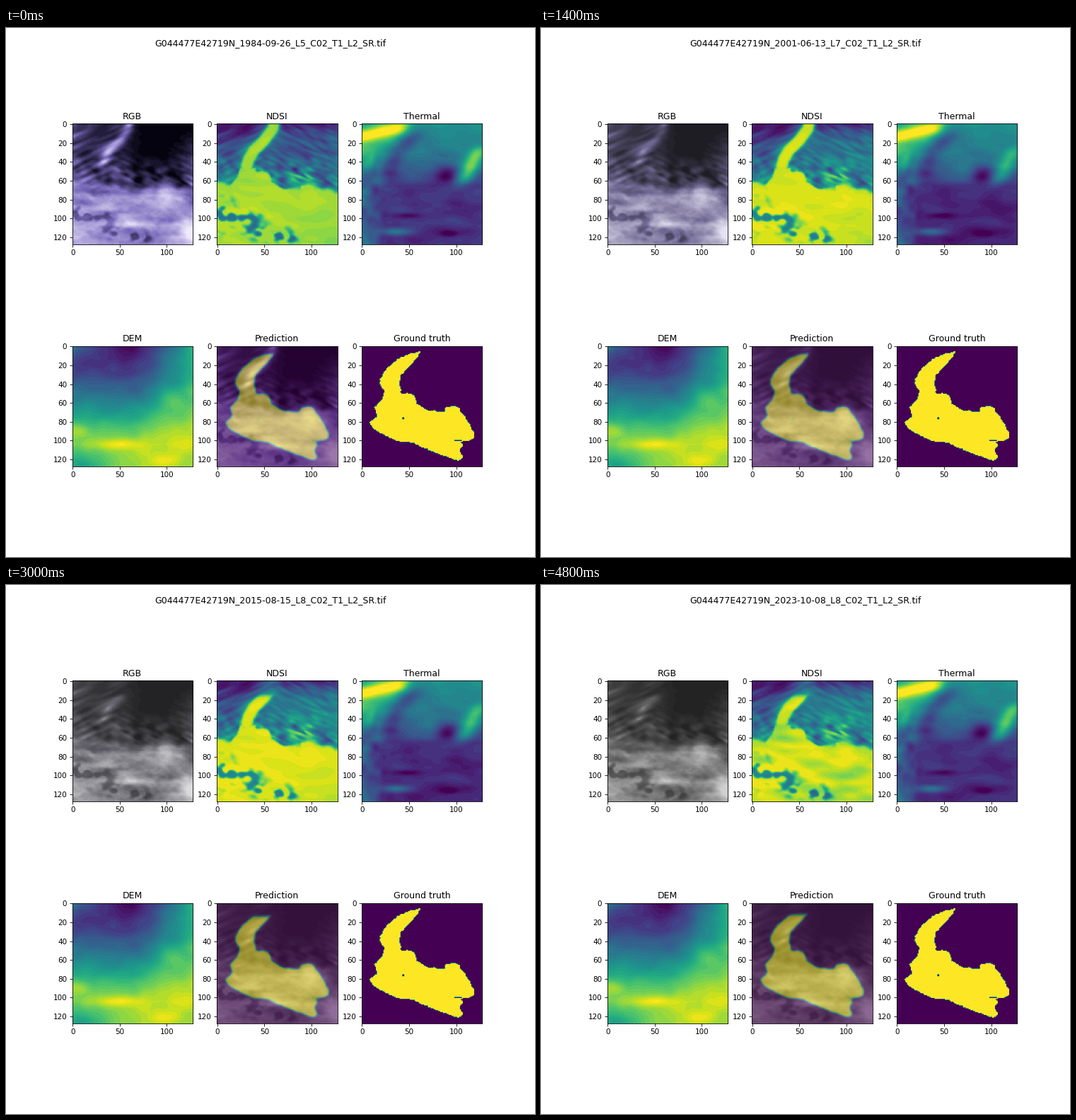
A matplotlib script that plays this animation: 748x748 px, repeating every 4.9 s.

```python
import numpy as np
import matplotlib.pyplot as plt
from matplotlib.animation import FuncAnimation
from matplotlib.path import Path

N = 128
FRAMES = 49
Y, X = np.mgrid[0:N, 0:N].astype(float)

# ---------- field helpers ----------


def noise(seed, length, width, angle=0):
    """Unit-variance noise, stretched along a direction."""
    ky, kx = np.meshgrid(np.fft.fftfreq(N), np.fft.fftfreq(N), indexing="ij")
    c, s = np.cos(angle), np.sin(angle)
    u, v = kx * c + ky * s, ky * c - kx * s
    low = np.exp(-2 * np.pi**2 * ((u * length) ** 2 + (v * width) ** 2))
    white = np.random.default_rng(seed).normal(size=(N, N))
    n = np.fft.ifft2(np.fft.fft2(white) * low).real
    return (n - n.mean()) / n.std()


def bell(a):
    return np.exp(-a * a)


def blob(x, y, rx, ry):
    return bell((X - x) / rx) * bell((Y - y) / ry)


def step(a):
    """Soft step from 0 to 1."""
    return 1 / (1 + np.exp(-np.clip(a, -50, 50)))


def blur(a, s):
    r = int(4 * s) + 1
    k = bell(np.arange(-r, r + 1) / s / np.sqrt(2))
    k /= k.sum()
    for _ in range(2):
        a = np.pad(a, ((0, 0), (r, r)), mode="edge")
        a = np.array([np.convolve(row, k, "valid") for row in a]).T
    return a


# ---------- glacier shapes ----------

OUTLINE = [(53, 7), (62, 6), (59, 12), (49, 22), (41, 32), (39, 38),
           (41, 50), (54, 51), (59, 62), (70, 68), (86, 70), (89, 65),
           (96, 63), (102, 65), (110, 77), (119, 92), (118, 98), (113, 101),
           (105, 101), (106, 106), (103, 112), (106, 115), (105, 121),
           (98, 120), (72, 111), (52, 102), (38, 101), (18, 92), (7, 81),
           (16, 74), (13, 65), (22, 55), (23, 48), (18, 39), (24, 25),
           (40, 12)]

jag = [0.35 * noise(seed, 1, 1) for seed in (21, 22)]
spots = np.c_[(X + jag[0]).ravel(), (Y + jag[1]).ravel()]
truth = Path(OUTLINE).contains_points(spots).reshape(N, N).astype(float)
truth[76:78, 43:45] = 0
truth[100, 98:106] = 0
guess = step(10 * (blur(truth, 1.8) - 0.57))

# centre line of the upper tongue
t = np.linspace(-3, 50, 90)
spine = np.interp(t, [0, 5, 18, 28, 38, 48], [60, 59, 49, 39, 33, 31])
gap = np.hypot(X[..., None] - spine, Y[..., None] - t).min(-1)

# upper rim of the snow field
rim = np.interp(X, [0, 20, 45, 75, 96, 127], [60, 66, 66, 70, 62, 71])
rim += 1.5 * noise(9, 3, 3)
field = step((Y - rim) / 1.5)

# ---------- texture ----------

sweep = noise(12, 5, 1.2, 0.45)
ridge = noise(13, 7, 1.5, -0.4)
drift = noise(14, 9, 3, 0.1)
patch = noise(15, 3, 2, 0.3)
grain = noise(16, 2, 1, 0.1)
right = step((X - 62 + 0.4 * Y) / 4)
streak = right * sweep + (1 - right) * ridge

rocky = (blob(50, 114, 19, 7) + blob(8, 98, 9, 14)
         + blob(27, 99, 14, 6) + blob(72, 121, 10, 5))
rocks = blur(np.clip(rocky * (1.6 * patch + 0.3), 0, 1), 0.7)

# ---------- static surfaces ----------

dem = np.interp(Y, [0, 30, 60, 85, 104, 127],
                [0.02, 0.2, 0.45, 0.7, 0.87, 0.86])
dem += 0.6 * np.clip((X - 62) / 65, 0, 1) ** 1.2 * (1 - Y / 118)
dem += 0.4 * np.clip(1 - X / 55, 0, 1) ** 1.3 * np.exp(-Y / 12)
dem += 0.12 * (blob(47, 104, 24, 6) + blob(98, 122, 16, 8)
               + blob(102, 57, 12, 12) + blob(0, 90, 16, 8))
dem -= 0.28 * blob(5, 130, 40, 22)
dem += 0.014 * noise(3, 5, 4)

east = bell((X - 137 + 0.5 * Y) / 10) * step((Y - 26) / 3) * step((62 - Y) / 3)
heat = np.interp(Y, [0, 20, 45, 65, 127], [0.5, 0.43, 0.36, 0.17, 0.15])
heat += 0.42 * bell((Y - 13 + 0.24 * X) / 7) * step((48 - X) / 4)
heat += 0.22 * bell((Y - 20 + 0.3 * X) / 15) * step((42 - X) / 5)
heat -= 0.17 * bell(gap / 9) * step((Y - 8) / 3)
heat += 0.45 * east + 0.25 * blob(36, 114, 16, 4)
heat += 0.16 * step((14 - X) / 4) * step((Y - 25) / 4)
heat -= 0.26 * blob(90, 53, 14, 9)
heat -= 0.15 * (blob(48, 97, 14, 3) + blob(92, 116, 9, 3))
heat += 0.02 * noise(5, 7, 3, 0.1)
heat += 0.05 * noise(6, 3, 4) * step((20 - X) / 5) * step((Y - 25) / 4)

bare = 0.17 * step((58 - X) / 6) + 0.12 * np.exp(-X / 15)
bare += 0.2 * step((X - 114) / 5) * step((Y - 22) / 6)
bare += 0.1 * step((Y - 42) / 4)
bare *= 1 + 0.3 * streak
bare += 0.07 * patch * step((Y - 42) / 4)

bright = 0.66 + 0.06 * drift + 0.03 * patch + 0.02 * grain
bright += 0.12 * blob(97, 74, 16, 14) + 0.3 * blob(57, 106, 20, 4)
bright += 0.3 * blob(125, 118, 14, 16) + 0.08 * blob(8, 120, 12, 12)
bright -= 0.26 * (blob(35, 94, 22, 3) + blob(26, 71, 24, 5))
bright -= 0.18 * blob(126, 82, 10, 14) + 0.35 * rocks
soft_field = step((Y - rim) / 2.5)
snow = bare * (1 - soft_field) + bright * soft_field
tongue = bell(gap / 5) * (1 + 0.1 * ridge) * step((46 - Y) / 3)

edge = np.maximum(6, 21 - 0.3 * X)
land = 0.08 + 0.2 * step((Y - edge) / 3) + 0.12 * step((Y - 44) / 5)
land += 0.16 * bell(gap / 9) + 0.045 * streak
land += 0.07 * patch * step((Y - 38) / 4)
land += 0.35 * blob(90, 54, 13, 7) * step(3 * sweep)
stroke = step((6.3 - gap) / 0.8) * (Y < 50)
ice = np.maximum.reduce([blur(truth * (Y > 46), 0.9), stroke, field])

# ---------- change over time ----------

DAYS = {0: (1984, 270), 8: (1997, 225), 14: (2001, 164), 22: (2008, 144),
        30: (2015, 227), 38: (2019, 261), 48: (2023, 281)}


def day(i):
    year, n = (int(round(np.interp(i, list(DAYS), col)))
               for col in zip(*DAYS.values()))
    return str(np.datetime64(f"{year}-01-01") + np.timedelta64(n - 1, "D"))


dates = sorted(day(i) for i in range(FRAMES))


def scene_name(i):
    year = int(dates[i][:4])
    sat = 8 if year > 2012 else 7 if 2000 <= year < 2004 else 5
    return f"G044477E42719N_{dates[i]}_L{sat}_C02_T1_L2_SR.tif"


def below_tip(i):
    """The tongue's visible top retreats downhill."""
    tip = np.interp(i, [14, 30], [-5, 15])
    return step((Y - tip) / 1.5)


def rgb(i):
    glow = np.interp(i, [0, 14], [0.5, 0.3])
    light = np.clip(snow + glow * tongue * below_tip(i), 0, 1)
    light = np.round(light * 24) / 24
    violet = np.interp(i, [0, 8, 22, 30, 38], [80, 46, 38, 8, 0])
    black = 33 * (1 - np.exp(-i / 9)) + 3
    white = 234 - 0.55 * i
    tint = violet * np.array([0.18, 0, 1])
    tones = black + 0.15 * tint, 0.46 * white + tint, white + 0.4 * tint
    return np.dstack([np.interp(light, [0, 0.5, 1], np.clip(c, 0, 255) / 255)
                      for c in np.transpose(tones)])


def ndsi(i):
    cover = ice * np.where(Y < 48, below_tip(i), 1)
    lift = 0.22 * (1 - np.exp(-i / 12))
    base = land + lift * blob(95, 34, 45, 24)
    level = np.interp(i, [0, 14, 38, 48], [0.86, 0.93, 0.95, 0.91])
    mottle = np.interp(i, [38, 48], [0.015, 0.05])
    frozen = level + mottle * drift - 0.07 * blob(127, 127, 25, 30)
    frozen = np.clip(frozen, 0, 0.97) - 0.5 * rocks
    return np.clip(base * (1 - cover) + frozen * cover, 0, 1)


def thermal(i):
    cool = np.interp(i, [0, 14, 48], [0, 0.15, 0.05])
    warm = np.interp(i, [0, 8, 30, 48], [0, 0.12, 0.1, 0.03])
    h = heat - cool * east - 0.3 * cool * step((Y - 65) / 5)
    return np.clip(h + warm * blob(74, 52, 15, 14), 0, 1)


def prediction(i):
    tip = np.interp(i, [22, 30, 48], [8, 14, 12])
    return guess * step(1.3 * (Y - tip))


# ---------- figure ----------

fig, axes = plt.subplots(2, 3, figsize=(10, 10), dpi=74.8)
title = fig.suptitle(scene_name(0))
names = ["RGB", "NDSI", "Thermal", "DEM", "Prediction", "Ground truth"]
for ax, name in zip(axes.flat, names):
    ax.set_title(name)

cmap = plt.get_cmap("viridis").resampled(36)


def show(ax, data, **kw):
    return ax.imshow(data, cmap=cmap, vmin=0, vmax=1, **kw)


a_rgb, a_ndsi, a_heat, a_dem, a_pred, a_truth = axes.flat
show(a_dem, np.clip(dem, 0, 1))
show(a_truth, truth)
live = [(show(a_rgb, rgb(0)), rgb),
        (show(a_ndsi, ndsi(0)), ndsi),
        (show(a_heat, thermal(0)), thermal),
        (show(a_pred, rgb(0)), rgb),
        (show(a_pred, prediction(0), alpha=0.5), prediction)]


def update(i):
    title.set_text(scene_name(i))
    for image, field_at in live:
        image.set_data(field_at(i))
    return [title] + [image for image, _ in live]


anim = FuncAnimation(fig, update, frames=FRAMES, interval=100)
plt.show()
```
